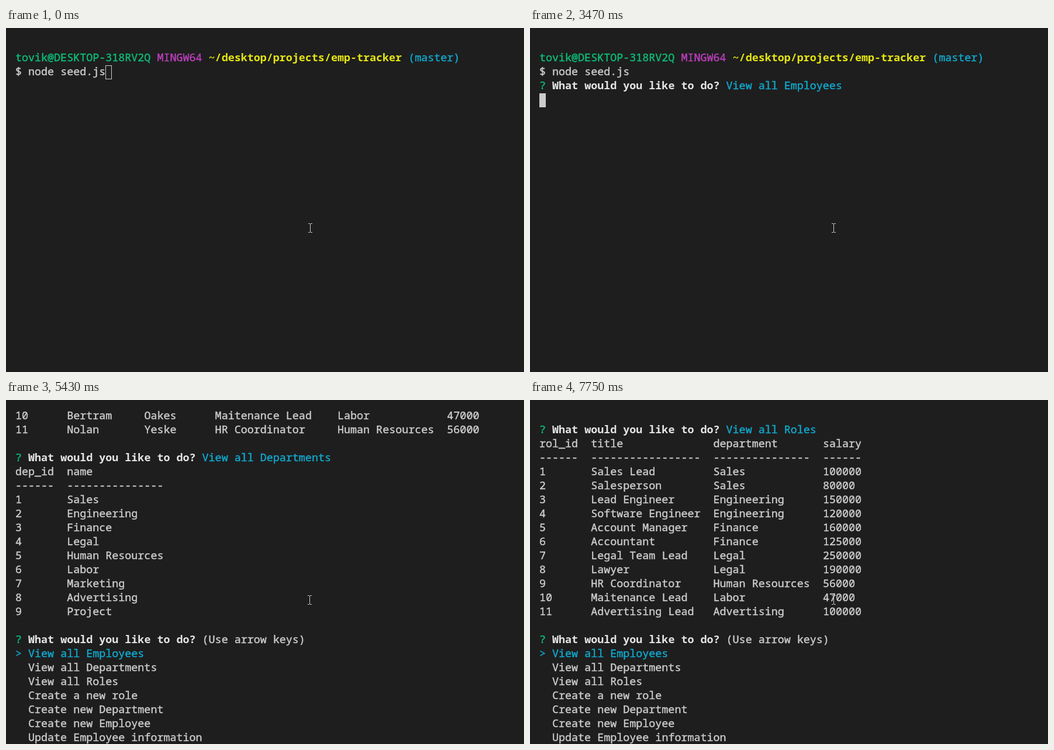
An HTML page with a canvas that plays this animation: 886 by 590 pixels, repeating every 8000 ms.

```html
<!DOCTYPE html>
<html lang="en">
<head>
<meta charset="utf-8">
<title>Employee tracker terminal</title>
<style>
html, body { margin: 0; width: 100%; height: 100%; overflow: hidden; background: #1e1e1e; }
canvas { display: block; }
</style>
</head>
<body>
<canvas id="stage" width="886" height="590"></canvas>
<script>
const ctx = document.getElementById('stage').getContext('2d');
const LOOP = 8000, CELL = 11.02, ROW = 24, ORIGIN = 16, ROWS = 24;
const BG = '#1e1e1e', FG = '#cccccc', GREEN = '#0dbc79', MAGENTA = '#bc3fbc',
      YELLOW = '#e5e510', CYAN = '#11a8cd', WHITE = '#e5e5e5';

// A line is a list of spans: [text, colour, weight]
const plain = text => [[text, FG]];

function table(head, rows) {
  const widths = head.map((h, i) => Math.max(h.length, ...rows.map(r => r[i].length)));
  const line = cells => plain(cells.map((c, i) => c.padEnd(widths[i])).join('  '));
  return [line(head), line(widths.map(w => '-'.repeat(w))), ...rows.map(line), plain('')];
}

const numbered = rows => rows.map((r, i) => [String(i + 1), ...r]);

const departments = ['Sales', 'Engineering', 'Finance', 'Legal', 'Human Resources',
  'Labor', 'Marketing', 'Advertising', 'Project'];

const roles = [
  ['Sales Lead', 0, 100000], ['Salesperson', 0, 80000],
  ['Lead Engineer', 1, 150000], ['Software Engineer', 1, 120000],
  ['Account Manager', 2, 160000], ['Accountant', 2, 125000],
  ['Legal Team Lead', 3, 250000], ['Lawyer', 3, 190000],
  ['HR Coordinator', 4, 56000], ['Maitenance Lead', 5, 47000],
  ['Advertising Lead', 7, 100000]
].map(([title, dep, pay]) => [title, departments[dep], String(pay)]);

const people = ['Orvell Tamm', 'Dovi Larst', 'Penn Marlowby', 'Sabine Torvel',
  'Linetta Quarne', 'Wilo Hesper', 'Tobin Ashwicke', 'Neri Volk',
  'Edric Selwick', 'Bertram Oakes', 'Nolan Yeske'];
const employees = people.map((name, i) => [...name.split(' '), ...roles[i < 10 ? i : 8]]);

const choices = ['View all Employees', 'View all Departments', 'View all Roles',
  'Create a new role', 'Create new Department', 'Create new Employee',
  'Update Employee information'];

const question = (tail = '', colour = FG) =>
  [['? ', GREEN], ['What would you like to do? ', WHITE, 700], [tail, colour]];
const answer = i => question(choices[i], CYAN);
const menu = (selected, hint) => [
  question(hint ? '(Use arrow keys)' : ''),
  ...choices.map((c, i) => i === selected ? [['> ' + c, CYAN]] : plain('  ' + c))
];

// Scrollback after each command
const start = [
  plain(''),
  [['tovik@DESKTOP-318RV2Q ', GREEN], ['MINGW64 ', MAGENTA],
   ['~/desktop/projects/emp-tracker ', YELLOW, 700], ['(master)', CYAN]],
  plain('$ node seed.js')
];
const asked = [...start, answer(0)];
const listed = [...asked, ...table(
  ['emp_id', 'first_name', 'last_name', 'title', 'department', 'salary'], numbered(employees))];
const grouped = [...listed, answer(1), ...table(
  ['dep_id', 'name'], numbered(departments.map(d => [d])))];
const ranked = [...grouped, answer(2), ...table(
  ['rol_id', 'title', 'department', 'salary'], numbered(roles))];

// Start time, lines, cursor [column, row, hollow]
const scenes = [
  [0, start, [14, 2, true]],
  [370, start, [14, 2]],
  [1910, [...start, ...menu(0, true)], [45, 10]],
  [3470, asked, [0, 4]],
  [3870, [...listed, ...menu(0, true)]],
  [4630, [...listed, ...menu(1)], [30, 23]],
  [5430, [...grouped, ...menu(0, true)]],
  [6590, [...grouped, ...menu(1)], [30, 23]],
  [6970, [...grouped, ...menu(2)], [30, 23]],
  [7750, [...ranked, ...menu(0, true)]]
];

function drawLine(spans, row) {
  const y = ORIGIN + row * ROW + 17;
  let col = 0;
  for (const [text, colour, weight = 400] of spans) {
    ctx.fillStyle = ctx.strokeStyle = colour;
    ctx.font = `${weight} 18.37px "Noto Sans Mono", monospace`;
    for (const { 0: word, index } of text.matchAll(/\S+/g)) {
      const x = ORIGIN + (col + index) * CELL;
      ctx.fillText(word, x, y);
      // A hairline outline gives regular text its fuller stems
      if (weight === 400) ctx.strokeText(word, x, y);
    }
    col += text.length;
  }
}

function drawCursor([col, row, hollow]) {
  const x = Math.round(ORIGIN + col * CELL), y = ORIGIN + row * ROW;
  ctx.fillStyle = FG;
  ctx.fillRect(x, y, 11, ROW);
  if (hollow) {
    ctx.fillStyle = BG;
    ctx.fillRect(x + 1, y + 1, 9, ROW - 2);
  }
}

function drawPointer(x) {
  ctx.fillStyle = FG;
  ctx.fillRect(x, 336, 1, 14);
  for (const y of [335, 350]) {
    ctx.fillRect(x - 3, y, 3, 1);
    ctx.fillRect(x + 1, y, 3, 1);
  }
}

function frame() {
  const t = performance.now() % LOOP;
  const [, lines, cursor] = scenes.findLast(s => s[0] <= t);
  ctx.fillStyle = BG;
  ctx.fillRect(0, 0, 886, 590);
  ctx.lineWidth = 0.45;
  ctx.lineJoin = 'round';
  lines.slice(-ROWS).forEach(drawLine);
  if (cursor) drawCursor(cursor);
  drawPointer(t < 370 ? 520 : 519);
  requestAnimationFrame(frame);
}
frame();
</script>
</body>
</html>
```
